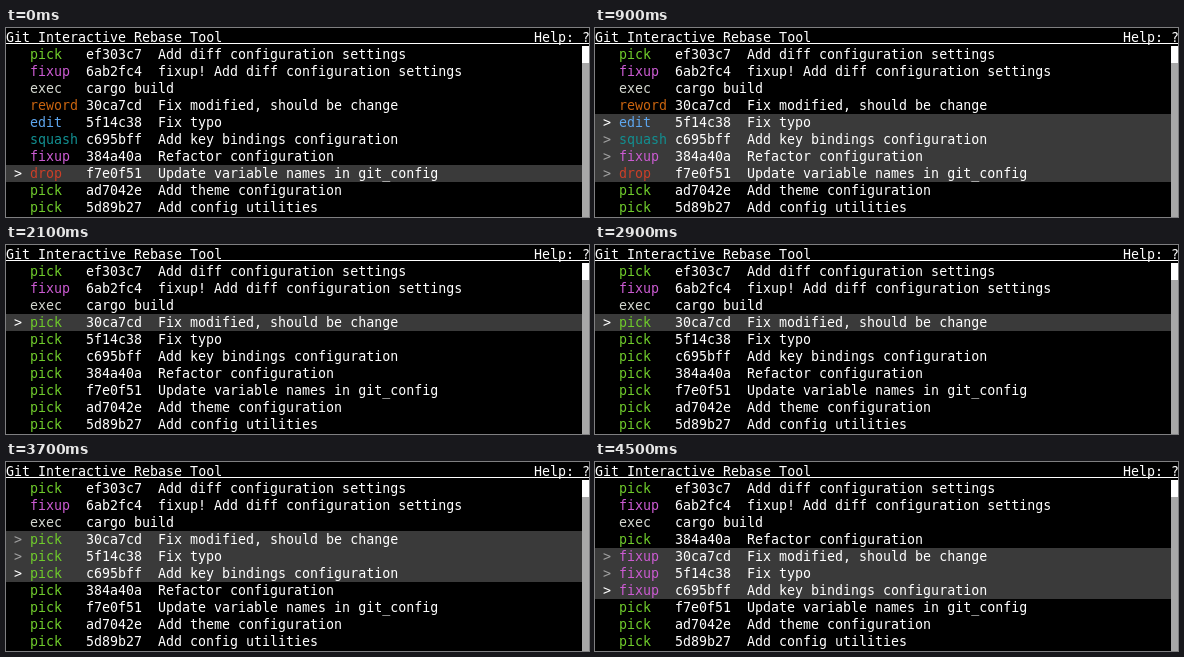
Write an HTML page that moves like this. It is 583 by 189 pixels and loops after 4600 ms.

```html
<!DOCTYPE html>
<html lang="en">
<head>
<meta charset="utf-8">
<title>Interactive rebase</title>
<style>
  html, body { margin: 0; width: 100%; height: 100%; overflow: hidden; background: #000; }
  svg { display: block; }
  text {
    font: 13.3px "DejaVu Sans Mono", monospace;
    fill: #fff;
    white-space: pre;
  }
</style>
</head>
<body>
<svg id="screen" width="583" height="189" viewBox="0 0 583 189"></svg>
<script>
const LOOP = 4600, CELL = 8, ROW = 17, TOP = 18;
const COLORS = {
  pick: '#6fcb2b', fixup: '#cb5bd2', exec: '#d3d7cf', reword: '#c9640f',
  edit: '#5ea6ee', squash: '#128f91', drop: '#cb3f28'
};
const COMMITS = [
  ['pick', 'ef303c7', 'Add diff configuration settings'],
  ['fixup', '6ab2fc4', 'fixup! Add diff configuration settings'],
  ['exec', 'cargo build', ''],
  ['reword', '30ca7cd', 'Fix modified, should be change'],
  ['edit', '5f14c38', 'Fix typo'],
  ['squash', 'c695bff', 'Add key bindings configuration'],
  ['fixup', '384a40a', 'Refactor configuration'],
  ['drop', 'f7e0f51', 'Update variable names in git_config'],
  ['pick', 'ad7042e', 'Add theme configuration'],
  ['pick', '5d89b27', 'Add config utilities']
];

// Key presses: [time in ms, command, argument]
const KEYS = [
  [500, 'move', -1], [800, 'move', -1], [900, 'move', -1], [1100, 'move', -1],
  [1400, 'action', 'pick'],
  [2100, 'collapse'],
  [3300, 'move', 1], [3700, 'move', 1],
  [4100, 'action', 'fixup'],
  [4500, 'swapDown']
];

const COMMANDS = {
  move(state, step) { state.cursor += step; },
  collapse(state) { state.anchor = state.cursor; },
  action(state, name) {
    const [first, last] = range(state);
    for (let i = first; i <= last; i++) state.rows[i][0] = name;
  },
  swapDown(state) {
    const [first, last] = range(state);
    const [below] = state.rows.splice(last + 1, 1);
    state.rows.splice(first, 0, below);
    state.cursor++;
    state.anchor++;
  }
};

function range({ cursor, anchor }) {
  return [Math.min(cursor, anchor), Math.max(cursor, anchor)];
}

function stateAt(time) {
  const state = { rows: COMMITS.map(row => [...row]), cursor: 7, anchor: 7 };
  for (const [at, command, arg] of KEYS) {
    if (at <= time) COMMANDS[command](state, arg);
  }
  return state;
}

const screen = document.getElementById('screen');

function add(tag, attrs, content = '') {
  const node = document.createElementNS('http://www.w3.org/2000/svg', tag);
  for (const key in attrs) node.setAttribute(key, attrs[key]);
  node.textContent = content;
  return screen.appendChild(node);
}

const rect = (x, y, width, height, fill) => add('rect', { x, y, width, height, fill });
const label = (col, y, content = '') => add('text', { x: col * CELL, y }, content);

rect(0, 0, 583, 189, '#000');
label(0, 14, 'Git Interactive Rebase Tool');
label(66, 14, 'Help: ?');
rect(0, 15, 583, 1, '#fff');
rect(576, TOP, 7, 171, '#a8a8a8');
rect(576, TOP, 7, ROW, '#fff');

const lines = COMMITS.map((_, i) => {
  const top = TOP + i * ROW, baseline = top + 13;
  return {
    band: rect(0, top, 576, ROW, '#3a3a3a'),
    marker: label(1, baseline, '>'),
    action: label(3, baseline),
    hash: label(10, baseline),
    title: label(19, baseline)
  };
});

function draw(time) {
  const state = stateAt(time);
  const [first, last] = range(state);
  lines.forEach((line, i) => {
    const [action, hash, title] = state.rows[i];
    const shown = i >= first && i <= last ? 'visible' : 'hidden';
    line.band.style.visibility = line.marker.style.visibility = shown;
    line.marker.style.fill = i === state.cursor ? '#fff' : '#a0a0a0';
    line.action.style.fill = COLORS[action];
    line.action.textContent = action;
    line.hash.textContent = hash;
    line.title.textContent = title;
  });
}

const start = performance.now();
function tick() {
  draw((performance.now() - start) % LOOP);
  requestAnimationFrame(tick);
}
tick();
</script>
</body>
</html>
```
